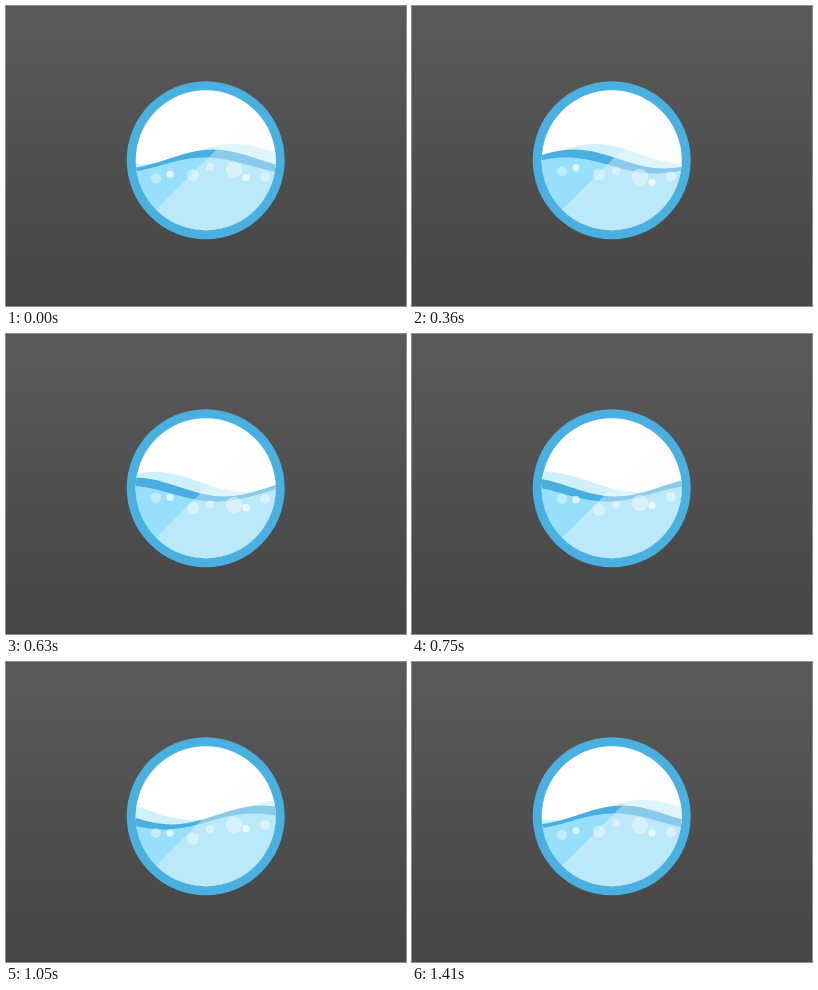
An HTML page with a canvas that plays this animation: 400 by 300 pixels, repeating every 1440 ms.

```html
<!DOCTYPE html>
<html lang="en">
<head>
<meta charset="utf-8">
<title>Water porthole</title>
<style>
  html, body { margin: 0; width: 100%; height: 100%; overflow: hidden; background: #505050; }
  canvas { display: block; width: 400px; height: 300px; }
</style>
</head>
<body>
<canvas id="stage" width="400" height="300"></canvas>
<script>
const ctx = document.getElementById('stage').getContext('2d');
const LOOP = 1440, STEP = 30, TAU = Math.PI * 2;
const CX = 199.7, CY = 154.2, OUTER = 79, INNER = 70;
const WAVELENGTH = 180;

// Back to front; crest is the x of a peak at the start of the loop.
const waves = [
  { color: '#cef1fd', crest: 228, mid: 148, amp: 10 },
  { color: '#49aee0', crest: 207, mid: 153, amp: 9.4 },
  { color: '#97dffa', crest: 199, mid: 159.5, amp: 8 }
];

// Bubbles bob on a shorter swell that travels left with the water.
const swell = { length: 140, trough: 276, height: 5 };
const bubbles = [
  { x: 150, y: 168.5, r: 5 },
  { x: 164, y: 166.6, r: 3.6 },
  { x: 187, y: 172.3, r: 6 },
  { x: 204, y: 166, r: 4 },
  { x: 228, y: 166.8, r: 8.2 },
  { x: 240, y: 171.6, r: 3.6 },
  { x: 259, y: 167, r: 5 }
];

const wall = ctx.createLinearGradient(0, 0, 0, 300);
wall.addColorStop(0, '#5a5a5a');
wall.addColorStop(1, '#454545');

function disc(x, y, r, fill) {
  ctx.beginPath();
  ctx.arc(x, y, r, 0, TAU);
  ctx.fillStyle = fill;
  ctx.fill();
}

function drawWave({ color, crest, mid, amp }, phase) {
  const left = CX - INNER - 2, right = CX + INNER + 2;
  ctx.beginPath();
  ctx.moveTo(left, 230);
  for (let x = left; x <= right; x += 2) {
    ctx.lineTo(x, mid - amp * Math.cos(TAU * ((x - crest) / WAVELENGTH + phase)));
  }
  ctx.lineTo(right, 230);
  ctx.fillStyle = color;
  ctx.fill();
}

function drawGloss() {
  ctx.beginPath();
  ctx.arc(CX, CY, INNER + 2, -Math.PI / 4, Math.PI * 3 / 4);
  ctx.fillStyle = 'rgba(250, 250, 250, 0.37)';
  ctx.fill();
}

function drawBubble({ x, y, r }, phase) {
  const lift = Math.cos(TAU * ((x - swell.trough) / swell.length + phase));
  const alpha = r < 4 ? 0.7 : 0.4;
  disc(x, y + swell.height * lift, r, `rgba(255, 255, 255, ${alpha})`);
}

function draw(phase) {
  ctx.fillStyle = wall;
  ctx.fillRect(0, 0, 400, 300);
  disc(CX, CY, OUTER, '#4ab0e0');
  disc(CX, CY, INNER, '#fff');

  ctx.save();
  ctx.beginPath();
  ctx.arc(CX, CY, INNER, 0, TAU);
  ctx.clip();
  for (const wave of waves) drawWave(wave, phase);
  drawGloss();
  for (const bubble of bubbles) drawBubble(bubble, phase);
  ctx.restore();
}

const start = performance.now();
function tick() {
  const t = (performance.now() - start) % LOOP;
  draw(Math.floor(t / STEP) * STEP / LOOP);
  requestAnimationFrame(tick);
}
tick();
</script>
</body>
</html>
```
